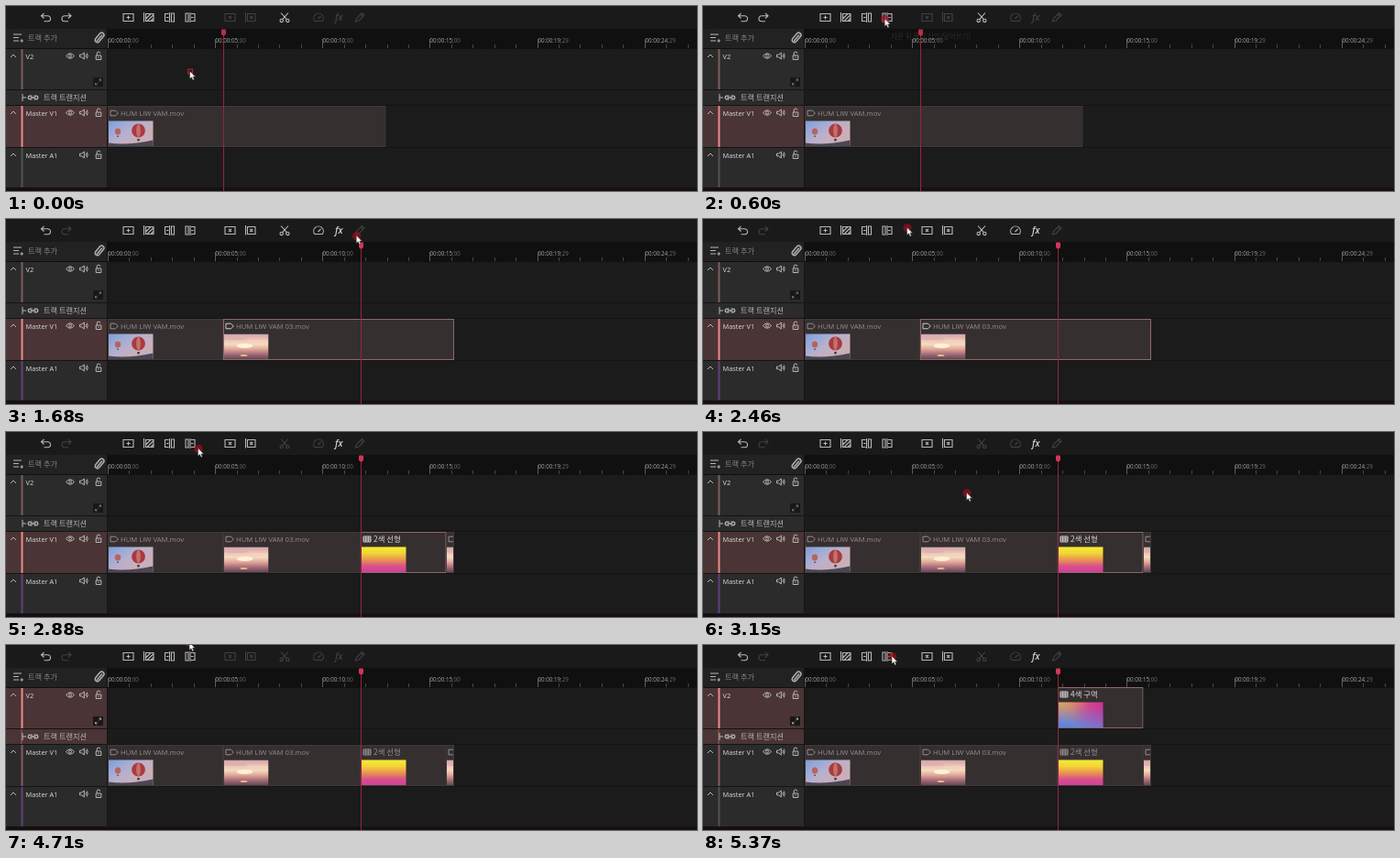
Animation, 754 px wide and 202 px high, one loop 5940 ms. Source, as an HTML page with a canvas:

```html
<!DOCTYPE html>
<html lang="ko">
<head>
<meta charset="utf-8">
<title>Timeline editing</title>
<style>
html, body { margin: 0; width: 100%; height: 100%; overflow: hidden; background: #1a1a1a; }
canvas { display: block; width: 754px; height: 202px; }
</style>
</head>
<body>
<canvas id="stage"></canvas>
<script>
const W = 754, H = 202, LOOP = 5940, STEP = 30;
const canvas = document.getElementById('stage');
const dpr = window.devicePixelRatio || 1;
canvas.width = W * dpr;
canvas.height = H * dpr;
const c = canvas.getContext('2d');

const LATIN = '"Open Sans", "Noto Sans", sans-serif';
const HANGUL = '"Noto Sans CJK KR", "Noto Sans CJK", "Noto Sans CJK JP", sans-serif';
const ON = '#b8b8b8', OFF = '#414141', PINK = '#f08a88';

// Moments at which the project changes
const INSERT = 780, SEEK = 1260, OVERWRITE = 2670, PICK_V2 = 3210, ADD_V2 = 5040;

// Pointer tip: time, x, y
const PATH = [
  [0, 200.5, 71], [60, 200.5, 70], [450, 198, 13.5], [840, 198.5, 14],
  [1140, 394, 39.5], [1230, 388, 39], [1530, 387, 37], [1770, 380, 9],
  [1860, 372, -16], [2370, 226, -16], [2460, 222.5, 9], [2580, 202, 13],
  [2820, 202, 13], [3150, 287.5, 66], [3240, 287, 67], [3540, 288, 66],
  [3840, 300, -16], [4620, 199, -16], [4710, 200, -3], [4770, 202, 6],
  [4890, 204, 11], [5370, 206, 12], [LOOP, 206, 12]
];

const ICON = {
  undo: 'M-2-4.5L-5-1.8L-2 1M-5-1.8H2A3 3 0 0 1 2 4.3H-2',
  redo: 'M2-4.5L5-1.8L2 1M5-1.8H-2A3 3 0 0 0-2 4.3H2',
  add: 'M-5.5-4H5.5V4H-5.5ZM-2 0H2M0-2V2',
  hatch: 'M-5.5-5.5V5M-3.5-4H5V4H-3.5ZM-3 1L2-4M-2 4L5-3M2 4L5 1',
  before: 'M-1-4H-5V4H-1M0-5.5V5.5M2-4.5V4.5H5V-4.5ZM-3.5 0H-1',
  after: 'M1-4H5V4H1M0-5.5V5.5M-2-4.5V4.5H-5V-4.5ZM1 0H3.5',
  remove: 'M-5.5-4H5.5V4H-5.5ZM-1.5-1.5L1.5 1.5M1.5-1.5L-1.5 1.5',
  ripple: 'M-5.5-5.5V5M-3.5-4H5V4H-3.5ZM-.8-1.5L2.2 1.5M2.2-1.5L-.8 1.5',
  cut: 'M-4-5L2.4 2.2M4-5L-2.4 2.2M-1.6 3.4A1.7 1.7 0 1 1-5 3.4A1.7 1.7 0 1 1-1.6 3.4M5 3.4A1.7 1.7 0 1 1 1.6 3.4A1.7 1.7 0 1 1 5 3.4',
  speed: 'M-4.2 4A5.3 5.3 0 1 1 4.2 4ZM-.5 1.5L2.5-1.5',
  pen: 'M-4.5 4.5L-3.5 1L2.5-5L5-2.5L-1 3.5ZM1-3.5L3.5-1',
  list: 'M-5-4H4M-5-.5H1M-5 3H1M2.5 3H6M4.2 1.2V4.8',
  magnet: 'M-3 3.5L3-3.5M-1 4.5L4.2-1.5A2.5 2.5 0 0 0 .5-5L-4.5 1A2.6 2.6 0 0 0-1 4.5',
  chevron: 'M-3 1.5L0-1.5L3 1.5',
  eye: 'M-4.5 0Q0-5.5 4.5 0Q0 5.5-4.5 0ZM1.5 0A1.5 1.5 0 1 1-1.5 0A1.5 1.5 0 1 1 1.5 0',
  sound: 'M-4.5-1.3H-2.5L.3-3.5V3.5L-2.5 1.3H-4.5ZM2-1.5Q3 0 2 1.5M3.2-3Q5.2 0 3.2 3',
  lock: 'M-2.8-.5H2.8V4H-2.8ZM-1.8-.5V-2.5A1.8 1.8 0 0 1 1.8-2.8M0 1V2.4',
  expand: 'M1-3H3V-1M3-3L.8-.8M-1 3H-3V1M-3 3L-.8.8',
  branch: 'M-2-4V4M-2 0H2',
  link: 'M-1-1.8H-3.5A1.8 1.8 0 0 0-3.5 1.8H-1M1-1.8H3.5A1.8 1.8 0 0 1 3.5 1.8H1M-3 0H3',
  film: 'M-4-2.8H1.5L4.3 0L1.5 2.8H-4Z',
  image: 'M-4-3H4V3H-4ZM-4-1H4M-4 1H4M-1.3-3V3M1.3-3V3'
};
for (const name in ICON) ICON[name] = new Path2D(ICON[name]);

function box(x, y, w, h, fill) {
  c.fillStyle = fill;
  c.fillRect(x, y, w, h);
}

function text(str, x, y, size, fill, font = LATIN) {
  c.font = `${size}px ${font}`;
  c.fillStyle = fill;
  c.fillText(str, x, y);
  return c.measureText(str).width;
}

function icon(name, x, y, color = ON, width = 1) {
  c.save();
  c.translate(x, y);
  c.strokeStyle = color;
  c.lineWidth = width;
  c.stroke(ICON[name]);
  c.restore();
}

function disc(x, y, rx, ry, fill) {
  c.fillStyle = fill;
  c.beginPath();
  c.ellipse(x, y, rx, ry, 0, 0, 7);
  c.fill();
}

function ramp(x0, y0, x1, y1, ...colors) {
  const g = c.createLinearGradient(x0, y0, x1, y1);
  colors.forEach((col, i) => g.addColorStop(i / (colors.length - 1), col));
  return g;
}

function toolbar(t) {
  box(0, 0, W, 25, '#1a1a1a');
  const clip = (t >= INSERT && t < PICK_V2) || t >= ADD_V2;
  const video = t >= INSERT && t < OVERWRITE;
  const canCut = t < INSERT || (t >= SEEK && t < OVERWRITE);
  [
    ['undo', 43.5, 1], ['redo', 66, t < INSERT], ['add', 133.5, 1], ['hatch', 156, 1],
    ['before', 178.5, 1], ['after', 201, 1], ['remove', 244.5, clip], ['ripple', 267, clip],
    ['cut', 304, canCut], ['speed', 341, video], ['pen', 386, 0]
  ].forEach(([name, x, on]) => icon(name, x, 12.5, on ? ON : OFF, 1.1));
  c.font = `italic 600 10px ${LATIN}`;
  c.fillStyle = clip ? '#d4d4d4' : OFF;
  c.fillText('fx', 359, 15.5);
}

function ruler() {
  box(0, 25, W, 22, '#101010');
  box(0, 25, 110, 21, '#222');
  icon('list', 13, 35);
  text('트랙 추가', 24, 38, 8.2, '#858585', HANGUL);
  icon('magnet', 102, 35, '#b0b0b0', 1.5);
  for (let i = 0; i < 28; i++) {
    const x = Math.round(111 + i * 23.43);
    const major = i % 5 === 0;
    box(x, major ? 36 : 42, 0.8, major ? 10 : 4, major ? '#707070' : '#555');
    if (!major) continue;
    const s = i / 5;
    const w = text('00:00:' + String(s > 3 ? s * 5 - 1 : s * 5).padStart(2, '0'), x + 0.5, 40, 6.2, '#a6a6a6');
    text(s > 3 ? ';29' : ';00', x + 0.5 + w, 40, 6.2, '#6c6c6c');
  }
}

function header(name, y, h, selected, stripe, eye) {
  box(0, y, 110, h, selected ? '#4a3435' : '#2b2b2b');
  box(16.5, y, 2, h, selected ? PINK : stripe);
  const my = y + 7.5;
  icon('chevron', 8, my);
  text(name, 21.5, my + 3, 7.4, '#dadada');
  if (eye) icon('eye', 70, my);
  icon('sound', 85, my);
  icon('lock', 101, my);
}

function tracks(t) {
  const v2 = t >= PICK_V2;
  box(0, 47, W, 155, '#1b1b1b');
  header('V2', 47, 44, v2, '#7d5f5c', true);
  box(95, 78, 11, 10, '#191717');
  icon('expand', 100.5, 83, v2 ? '#c0c0c0' : '#858585', 0.8);
  box(0, 92, 110, 16, v2 ? '#4a3435' : '#2b2b2b');
  box(16.5, 92, 1, 16, v2 ? '#9a6264' : '#3b3030');
  icon('branch', 20, 100);
  icon('link', 29.5, 100, ON, 1.3);
  text('트랙 트랜지션', 41, 103, 8.2, '#b5b5b5', HANGUL);
  header('Master V1', 109, 45, !v2, '#8a5a5c', true);
  const audio = t < SEEK || t >= ADD_V2 ? '#555154' : '#65407a';
  header('Master A1', 155, 43, false, audio, false);
  [91, 108, 154, 198].forEach(y => box(0, y, W, 1, '#141414'));
  box(110, 47, 1, 152, '#161616');
  box(0, 199, W, 3, '#180f11');
}

function balloons(x, y) {
  box(x, y, 49, 28, ramp(x, y, x + 20, y + 28, '#7f9bd6', '#9aaad8', '#b9b0cc', '#c8afba'));
  c.fillStyle = '#4b4553';
  c.beginPath();
  c.moveTo(x, y + 28);
  c.lineTo(x, y + 24);
  c.quadraticCurveTo(x + 22, y + 27, x + 49, y + 21);
  c.lineTo(x + 49, y + 28);
  c.fill();
  disc(x + 10.5, y + 11.5, 3.2, 3.5, '#b9625f');
  box(x + 9.8, y + 16, 1.5, 1.5, '#593a40');
  disc(x + 33, y + 10.5, 7.4, 7.4, '#a83a40');
  disc(x + 33, y + 10.5, 2.4, 7.2, '#c4706c');
  box(x + 31.8, y + 19.5, 2.4, 2.4, '#49333a');
}

function sunset(x, y, w) {
  c.save();
  c.beginPath();
  c.rect(x, y, w, 28);
  c.clip();
  box(x, y, 49, 28, ramp(0, y, 0, y + 28, '#c9a3ae', '#ecc0b0', '#f4dcc0', '#e0a596', '#a06a78', '#5f4353'));
  disc(x + 13, y + 5, 13, 1.6, '#dfb0b2');
  disc(x + 37, y + 8, 12, 1.5, '#f4d2c2');
  disc(x + 23, y + 13, 9, 2.4, '#fff1d8');
  disc(x + 22, y + 23.5, 4, 0.9, '#f0bc91');
  c.restore();
}

function twoColor(x, y) {
  box(x, y, 49, 28, ramp(0, y, 0, y + 28, '#f4ec35', '#f2d436', '#e99550', '#d8508a', '#cf3f9c'));
}

function fourColor(x, y) {
  box(x, y, 49, 28, ramp(x, y, x + 49, y + 8, '#f5b83c', '#ee8a58', '#d94688', '#c9329a'));
  box(x, y, 49, 28, ramp(x + 26, y, x + 20, y + 28, 'rgba(90,125,225,0)', 'rgba(110,125,215,.5)', '#5488e8'));
}

function clip(x, y, w, label, { kind = 'film', selected = false, lit = selected, font = LATIN, size = 7.7, thumb }) {
  const tone = lit ? '#dcd8d8' : '#938d8d';
  c.save();
  c.beginPath();
  c.rect(x, y, w, 45);
  c.clip();
  box(x, y, w, 45, '#352f2f');
  icon(kind, x + 7, y + 8, selected ? '#d0cccc' : tone);
  text(label, x + 14, y + 11, size, tone, font);
  thumb(x + 0.5, y + 16.5, Math.min(49, w));
  c.strokeStyle = selected ? '#8e6868' : '#413939';
  c.lineWidth = 1;
  c.strokeRect(x + 0.5, y + 0.5, w - 1, 44);
  c.restore();
}

function clips(t) {
  const image = { kind: 'image', font: HANGUL, size: 8.4 };
  const split = t >= INSERT;
  clip(111, 109, split ? 126 : 303.5, 'HUM LIW VAM.mov', { thumb: balloons });
  if (split) {
    const over = t >= OVERWRITE;
    clip(237, 109, over ? 150 : 252, 'HUM LIW VAM 03.mov', { selected: !over, lit: t < SEEK, thumb: sunset });
    if (over) {
      clip(480, 109, 9, '', { thumb: sunset });
      clip(387, 109, 93.5, '2색 선형', { ...image, selected: t < PICK_V2, thumb: twoColor });
    }
  }
  if (t >= ADD_V2) clip(387, 46, 93.5, '4색 구역', { ...image, selected: true, thumb: fourColor });
}

function playhead(t) {
  const x = t < SEEK ? 237 : 387;
  box(x, 30, 1, 172, '#96243f');
  c.fillStyle = t < INSERT ? '#b92f45' : '#d63556';
  c.beginPath();
  c.roundRect(x - 2, 25.5, 5, 7, [1, 1, 2.4, 2.4]);
  c.fill();
}

function tooltip(t) {
  if (t < 600 || t >= INSERT) return;
  c.globalAlpha = Math.min(0.75, 0.22 + (t - 600) / 200);
  text('자른 뒤 클립 삽입(덮어쓰기)', 205, 36, 7.6, '#a08c8c', HANGUL);
  c.globalAlpha = 1;
}

function pointer(t) {
  const i = PATH.findIndex(k => k[0] > t);
  const [t0, x0, y0] = PATH[i - 1], [t1, x1, y1] = PATH[i];
  const u = (t - t0) / (t1 - t0), e = u * u * (3 - 2 * u);
  const x = x0 + (x1 - x0) * e, y = y0 + (y1 - y0) * e;
  if (t < 60) {
    c.strokeStyle = '#b51c2c';
    c.lineWidth = 1.2;
    c.strokeRect(x - 2, y - 2, 5, 5);
  } else {
    disc(x + 0.5, y + 0.8, 4.7, 4.7, 'rgba(165,12,28,.65)');
  }
  c.save();
  c.translate(x, y);
  c.beginPath();
  c.moveTo(0, 0);
  [[0, 8.6], [2, 6.8], [3.4, 10], [4.9, 9.3], [3.6, 6.3], [6.2, 6.2]].forEach(p => c.lineTo(...p));
  c.closePath();
  c.fillStyle = '#f4f4f4';
  c.fill();
  c.strokeStyle = '#222';
  c.lineWidth = 0.5;
  c.stroke();
  c.restore();
}

function draw(ms) {
  const t = Math.floor((ms % LOOP) / STEP) * STEP;
  c.setTransform(dpr, 0, 0, dpr, 0, 0);
  toolbar(t);
  ruler();
  tracks(t);
  clips(t);
  playhead(t);
  tooltip(t);
  pointer(t);
}

const start = performance.now();
function tick() {
  draw(Math.max(0, performance.now() - start));
  requestAnimationFrame(tick);
}
tick();
</script>
</body>
</html>
```
